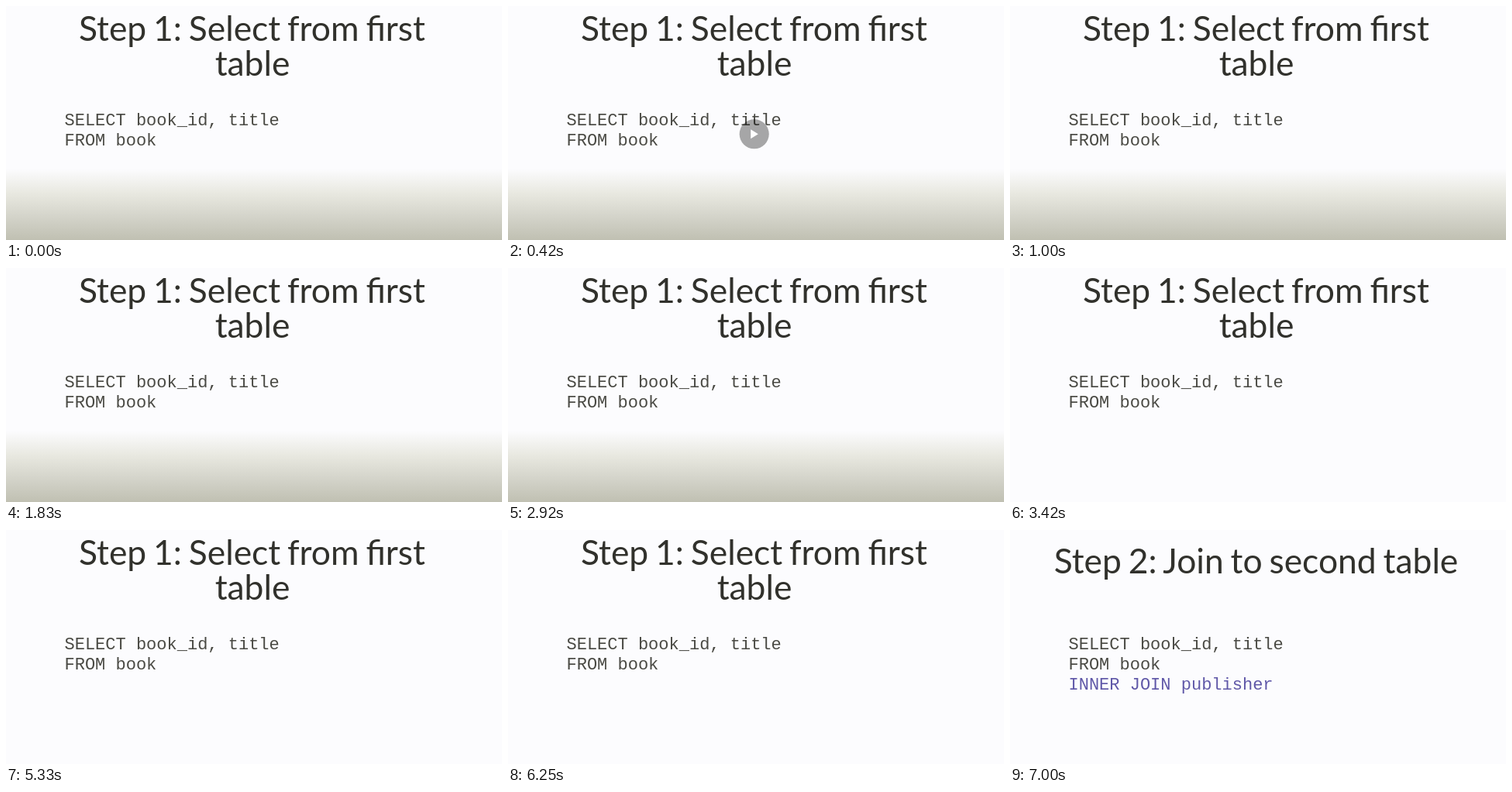
Animation of 640x302 px, one loop 8 s. Source, as an HTML page:

```html
<!DOCTYPE html>
<html lang="en">
<head>
<meta charset="utf-8">
<style>
  html, body { margin: 0; width: 100%; height: 100%; overflow: hidden; background: #fcfcfe; }
  svg { display: block; width: 640px; height: 302px; }
  .title { font: 44.4px Lato, sans-serif; word-spacing: -2.5px; fill: #31312c; text-anchor: middle; }
  .code { font: 22px "Liberation Mono", monospace; fill: #4a4a44; white-space: pre; }
  .new { fill: #6058a8; }
</style>
</head>
<body>
<svg viewBox="0 0 640 302">
  <defs>
    <linearGradient id="dim" x2="0" y2="1">
      <stop offset="0" stop-color="#fcfcfe"/>
      <stop offset=".35" stop-color="#e8e8e0"/>
      <stop offset=".7" stop-color="#d2d2c8"/>
      <stop offset="1" stop-color="#c0c0b2"/>
    </linearGradient>
  </defs>
  <rect id="shade" y="210" width="640" height="92" fill="url(#dim)"/>
  <g id="step1" class="title">
    <text x="317.5" y="45">Step 1: Select from first</text>
    <text x="318" y="89.5">table</text>
  </g>
  <g id="step2">
    <text class="title" x="317.5" y="56">Step 2: Join to second table</text>
    <text class="code new" x="75.5" y="206">INNER JOIN publisher</text>
  </g>
  <g class="code">
    <text x="75.5" y="154">SELECT book_id, title</text>
    <text x="75.5" y="180">FROM book</text>
  </g>
  <g id="play">
    <circle r="14.4" fill="#000" fill-opacity=".5"/>
    <path d="M-3.4-4.5L3.9 0L-3.4 4.5Z" fill="#fff"/>
  </g>
</svg>
<script>
  const LOOP = 8000, FRAME = 1000 / 12;
  const FADE_START = 3330, FADE_END = 3420, STEP2 = 6500;
  const PLAY_START = 255, PLAY_TIME = 500;
  const $ = id => document.getElementById(id);
  const show = (id, opacity) => $(id).setAttribute("opacity", opacity);

  function draw(t) {
    show("shade", t < FADE_START ? 1 : t < FADE_END ? 0.3 : 0);
    show("step1", t < STEP2 ? 1 : 0);
    show("step2", t < STEP2 ? 0 : 1);

    // The play badge grows to double size while it fades out.
    const p = (Math.floor(t / FRAME) * FRAME - PLAY_START) / PLAY_TIME;
    show("play", p >= 0 && p < 1 ? 1 - p : 0);
    $("play").setAttribute("transform", `translate(317.7 165.3) scale(${1 + p})`);
  }

  const start = performance.now();
  function tick() {
    draw((performance.now() - start) % LOOP);
    requestAnimationFrame(tick);
  }
  tick();
</script>
</body>
</html>
```
